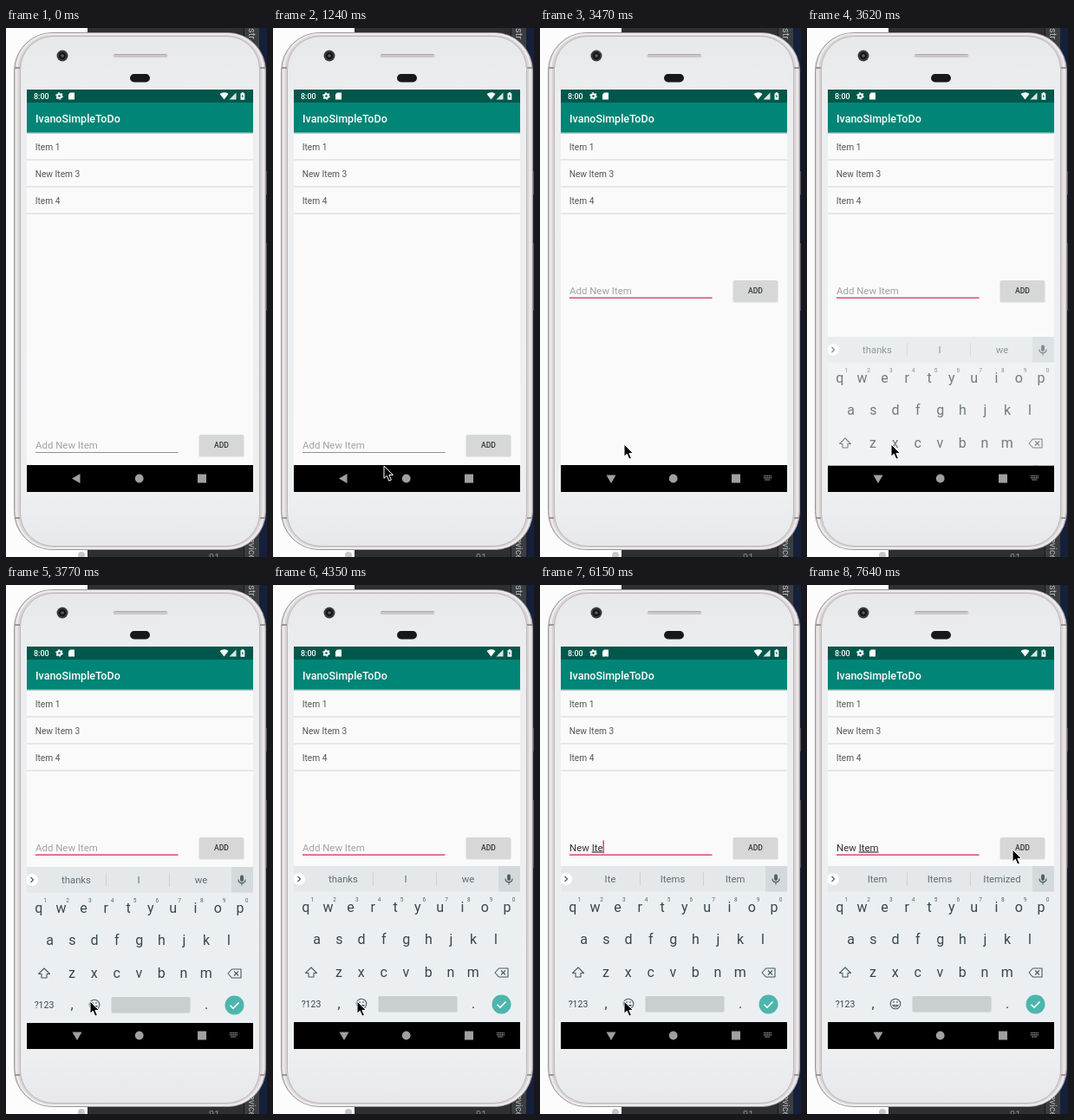
Animation, 301 px wide and 610 px high, one loop 8 s. Source, as an HTML page:

```html
<!DOCTYPE html>
<html lang="en">
<head>
<meta charset="utf-8">
<title>To-do list on a phone</title>
<style>
html, body { margin: 0; width: 100%; height: 100%; overflow: hidden; background: #fff; }
svg { display: block; width: 301px; height: 610px; font-family: Roboto, "Noto Sans", sans-serif; }
text { white-space: pre; }
.mid { text-anchor: middle; }
.item { font-size: 10.2px; fill: #555; }
.field { font-size: 11.45px; }
.word { font-size: 11.3px; fill: #626c71; }
.key { font-size: 16px; fill: #37474f; }
.num { font-size: 6.5px; fill: #59666c; }
.side { font-size: 11px; fill: #b4b6b8; }
.icon { fill: none; stroke: #455a64; stroke-width: 1.1; stroke-linejoin: round; }
</style>
</head>
<body>
<svg viewBox="0 0 301 610">
  <defs>
    <linearGradient id="shell" x2="0" y2="1">
      <stop offset="0" stop-color="#e6e8ea"/><stop offset=".12" stop-color="#eceef0"/>
      <stop offset=".9" stop-color="#edeff1"/><stop offset="1" stop-color="#e6e8eb"/>
    </linearGradient>
    <clipPath id="panel"><rect x="24" y="320" width="261" height="185"/></clipPath>
  </defs>

  <!-- desktop behind the phone -->
  <rect width="301" height="610" fill="#fcfcfc"/>
  <rect x="94" width="181" height="610" fill="#2d2f31"/>
  <rect x="275" width="17" height="610" fill="#3b3e40"/>
  <path d="M274.500 0V610" stroke="#18191a"/>
  <rect x="292" width="9" height="610" fill="#15203a"/>
  <circle cx="87" cy="608" r="4" fill="#c6c6c6"/>
  <text class="side" transform="translate(280 0) rotate(90)">str</text>
  <text class="side" transform="translate(280 588) rotate(90)">evice</text>
  <text class="side" x="234" y="614" opacity=".7">91</text>

  <!-- phone shell -->
  <path d="M299 165h1.500v27h-1.500zM299 248h1.500v78h-1.500z" fill="#8b888c"/>
  <rect x="9.500" y="5.500" width="290" height="596" rx="44" fill="#d9d4d6" stroke="#9c9598"/>
  <rect x="12.500" y="7" width="284" height="593" rx="41" fill="none" stroke="#efecee" stroke-width="2"/>
  <rect x="16.500" y="9.500" width="276" height="588" rx="38" fill="url(#shell)" stroke="#bdb5b8"/>
  <path d="M10 46h6M293 46h6M10 565h6M293 565h6" stroke="#9c9598" stroke-width="2"/>
  <circle cx="65" cy="32" r="6.500" fill="#3a3c3f"/>
  <circle cx="65" cy="32" r="4.300" fill="#15171a"/>
  <circle cx="65" cy="32" r="1.800" fill="#596068"/>
  <rect x="123.500" y="30" width="63" height="4" rx="2" fill="#cdc7ca"/>
  <path d="M125 30.500H185" stroke="#aaa5a8"/>
  <rect x="143" y="53" width="23" height="9.500" rx="4.700" fill="#17181a"/>

  <!-- app -->
  <rect x="24" y="71" width="261" height="464" fill="#fafafa"/>
  <rect x="24" y="120" width="261" height="2" fill="#bfc9c7"/>
  <rect x="24" y="86" width="261" height="34.500" fill="#008577"/>
  <rect x="24" y="71" width="261" height="15" fill="#00574b"/>
  <g fill="#fff">
    <text x="32" y="82" font-size="9" font-weight="500">8:00</text>
    <circle cx="61.500" cy="78.500" r="2.300" fill="none" stroke="#fff" stroke-width="2"/>
    <circle cx="61.500" cy="78.500" r="3.700" fill="none" stroke="#fff" stroke-width="1.200" stroke-dasharray="1.900 1.970"/>
    <path d="M74 74.500h5v8h-7v-6z"/>
    <path d="M246.500 76q5-3.500 10 0l-5 6.500z"/>
    <path d="M265.500 74.500v8h-8z" opacity=".85"/>
    <path d="M270.500 75.300h1.300v-1h2.200v1h1.300v7.500h-4.800z"/>
    <text x="34" y="108.500" font-size="12.500" font-weight="500">IvanoSimpleToDo</text>
  </g>
  <path d="M273 76.500l-1.300 2.500h1v2.300l1.400-2.800h-1.100z" fill="#00574b"/>
  <g id="list"></g>

  <!-- entry row -->
  <g id="entry">
    <text id="hint" class="field" x="34" y="485.500">Add New Item</text>
    <text id="typed" class="field" x="34" y="485.500" fill="#333"><tspan id="done"></tspan><tspan id="compose" text-decoration="underline"></tspan></text>
    <rect id="line" x="34" width="164.500"/>
    <rect id="caret" y="473.500" width="1.200" height="15" fill="#d81b60"/>
    <rect x="222.500" y="470.500" width="52" height="25" rx="1.500" fill="#c2c3c3" opacity=".6"/>
    <rect x="223" y="470" width="51" height="24" rx="1.500" fill="#d6d7d7"/>
    <text class="mid" x="248.500" y="485.300" font-size="8.600" font-weight="500" fill="#333">ADD</text>
  </g>

  <!-- navigation bar -->
  <rect x="24" y="504" width="261" height="31" fill="#000"/>
  <g fill="#a0a0a0">
    <path id="back" d="M76 519.500l9.500-5.500v11z"/>
    <circle cx="153.700" cy="519.500" r="4.900"/>
    <rect x="221" y="514.500" width="10" height="10"/>
    <g id="switcher">
      <path d="M76.500 515.500h11l-5.500 9.500z"/>
      <path d="M258 516.500h9M258 518.800h9M259.500 521.100h6" stroke="#8a8a8a" stroke-width="1.500" stroke-dasharray="1.300 .6"/>
    </g>
  </g>

  <!-- keyboard -->
  <g clip-path="url(#panel)"><g id="board">
    <rect x="24" y="324" width="261" height="180" fill="#eceff1"/>
    <rect x="24" y="324" width="261" height="29.500" fill="#e4e8ea"/>
    <rect x="260" y="324" width="25" height="29.500" fill="#d4d9dc"/>
    <path d="M115.500 331v16M188.500 331v16" stroke="#cdd2d5"/>
    <circle cx="30" cy="339" r="7" fill="#fff"/>
    <path class="icon" d="M28.500 336l3 3-3 3" stroke-width="1.400"/>
    <rect x="270" y="333.500" width="4" height="7.500" rx="2" fill="#546067"/>
    <path class="icon" d="M268 338.500c0 5.500 8 5.500 8 0M272 343v2.500"/>
    <g id="words"></g>
    <g id="keys"></g>
    <path class="icon" d="M44 441l-6.500 6.500h3.500v4.500h6v-4.500h3.500z"/>
    <path class="icon" d="M256 447l4.500-5h10.500v10h-10.500zM263 444.500l5 5M268 444.500l-5 5"/>
    <text class="mid" x="44" y="486.500" font-size="10.500" fill="#37474f">?123</text>
    <circle class="icon" cx="102" cy="483" r="5.800"/>
    <path class="icon" d="M98.800 484.500q3.200 4 6.400 0z"/>
    <path d="M99.300 480.300h1.500v1.500h-1.500zM103.200 480.300h1.500v1.500h-1.500z" fill="#455a64"/>
    <rect x="121.500" y="474" width="91" height="18.500" rx="1.500" fill="#c9ced1"/>
    <circle cx="263.500" cy="483.500" r="11" fill="#4db6ac"/>
    <path d="M258.500 483.700l3.500 3.500 6.500-6.700" fill="none" stroke="#fff" stroke-width="1.600"/>
  </g></g>

  <path id="mouse" d="M0 0v14.300l3.300-3 2.500 5.900 2.600-1.100-2.500-5.700h4.500z" fill="#000" stroke="#fff" stroke-width="1"/>
</svg>
<script>
const LOOP = 8000;
const $ = id => document.getElementById(id);

function add(parent, tag, attrs, text = "") {
  const el = document.createElementNS("http://www.w3.org/2000/svg", tag);
  for (const name in attrs) el.setAttribute(name, attrs[name]);
  el.textContent = text;
  return $(parent).appendChild(el);
}

["Item 1", "New Item 3", "Item 4"].forEach((label, i) => {
  const y = 140.7 + 31 * i;
  add("list", "text", { class: "item", x: 33.7, y }, label);
  add("list", "rect", { x: 24, y: 151.5 + 31 * i, width: 261, height: 1, fill: "#d6d6d6" });
});

function keyRow(chars, x, y) {
  [...chars].forEach((c, i) => add("keys", "text", { class: "key mid", x: x + 25.8 * i, y }, c));
}
keyRow("qwertyuiop", 37.8, 376.5);
keyRow("asdfghjkl", 50.5, 413.5);
keyRow("zxcvbnm", 76, 451.5);
keyRow(",", 76, 487.5);
keyRow(".", 231, 487.5);
[..."1234567890"].forEach((n, i) =>
  add("keys", "text", { class: "num mid", x: 45.3 + 25.8 * i, y: 365 }, n));

const words = [81, 153, 225].map(x => add("words", "text", { class: "word mid", x, y: 343 }));

// Each step keeps the state before it and changes only what it names.
const steps = [
  [0, { mouse: null, focus: false, hint: "#a3a3a3", lift: 1, nav: false, board: null,
        caret: false, done: "", compose: "", words: "thanks,I,we" }],
  [500, { mouse: [222, 596] }],
  [650, { mouse: [211, 582] }],
  [800, { mouse: [194, 563] }],
  [940, { mouse: [173, 542] }],
  [1090, { mouse: [150, 522] }],
  [1240, { mouse: [128, 505] }],
  [1380, { mouse: [110, 493] }],
  [1530, { mouse: [100, 486] }],
  [1680, { mouse: [97, 480] }],
  [2730, { focus: true, hint: "#868686" }],
  [2880, { hint: "#a3a3a3", caret: true }],
  [3020, { nav: true }],
  [3470, { lift: 179, caret: false }],
  [3620, { board: [32, 0.7] }],
  [3770, { board: [1, 1] }],
  [3910, { board: [0, 1], caret: true }],
  [4350, { caret: false }],
  [4950, { caret: true }],
  [5100, { compose: "N" }],
  [5250, { words: ",," }],
  [5400, { words: "New,News,Now" }],
  [5550, { compose: "Ne", words: "New,Need,Next" }],
  [5700, { compose: "New", words: "New,News,Newer" }],
  [5850, { done: "New\u00a0", compose: "", words: "one,job,year" }],
  [6000, { compose: "I", words: "I,In,If" }],
  [6150, { compose: "Ite", words: "Ite,Items,Item" }],
  [6300, { compose: "Item", words: "Item,Items,Itemized" }],
  [6750, { mouse: [108, 463], caret: false }],
  [6900, { mouse: [156, 388] }],
  [7050, { mouse: [210, 314] }],
  [7200, { mouse: [232, 290], caret: true }],
  [7340, { mouse: [237, 305] }],
  [7640, { caret: false }],
];

const show = (el, on) => { el.style.display = on ? "" : "none"; };
const move = (el, x, y) => el.setAttribute("transform", `translate(${x} ${y})`);

function draw(s) {
  show($("mouse"), s.mouse);
  if (s.mouse) move($("mouse"), ...s.mouse);

  move($("entry"), 0, -s.lift);
  show($("hint"), !(s.done + s.compose));
  $("hint").setAttribute("fill", s.hint);
  $("done").textContent = s.done;
  $("compose").textContent = s.compose;
  const line = $("line");
  line.setAttribute("y", s.focus ? 489.5 : 490);
  line.setAttribute("height", s.focus ? 1.4 : 1);
  line.setAttribute("fill", s.focus ? "#dc3a73" : "#929292");
  show($("caret"), s.caret);
  $("caret").setAttribute("x", 34 + $("typed").getComputedTextLength());

  show($("board"), s.board);
  if (s.board) {
    move($("board"), 0, s.board[0]);
    $("board").setAttribute("opacity", s.board[1]);
  }
  s.words.split(",").forEach((w, i) => { words[i].textContent = w; });
  show($("back"), !s.nav);
  show($("switcher"), s.nav);
}

let last = -1;
function tick() {
  const t = performance.now() % LOOP;
  const past = steps.filter(([at]) => at <= t);
  if (past.length !== last) {
    last = past.length;
    draw(Object.assign({}, ...past.map(([, change]) => change)));
  }
  requestAnimationFrame(tick);
}
tick();
</script>
</body>
</html>
```
